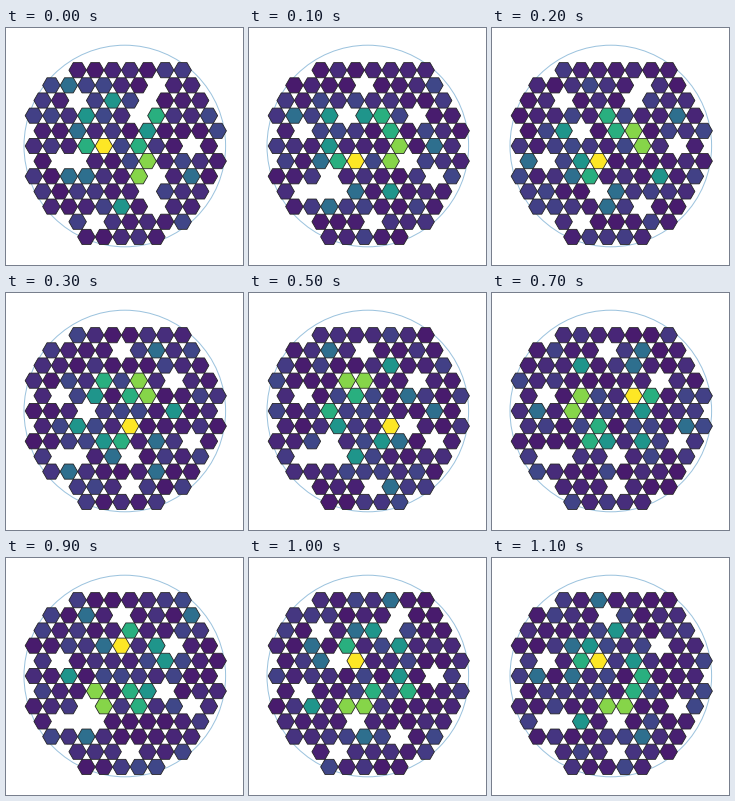
Animation of 237x237 px, one loop 1200 ms. Source, as a matplotlib script:

```python
import numpy as np
import matplotlib.pyplot as plt
from matplotlib.animation import FuncAnimation
from matplotlib.collections import PolyCollection
from matplotlib.patches import Circle

SIZE, DPI, STEPS = 237, 100, 12
PX = 72 / DPI
STEP = 17.5                                # distance between hexagon centres
CENTER, RADIUS = np.array([118.8, 118.0]), 100.8
PIVOT = np.array([118.0, 117.0])           # the bright samples turn around this
GAP_PIVOT = np.array([117.0, 126.0])       # the gaps turn around this
LEVELS = [1.0, 0.82, 0.63, 0.52, 0.36]     # level k is shared by k + 1 samples

# Brightest first, relative to the pivot with y up
SAMPLES = np.array([
    (-21.5, -1.5),
    (28.7, -16.6), (12, -29),
    (20, 0), (-38, 2), (31, 22),
    (-11, 44), (-32, 24), (18, 21), (-4, -57),
    (60, -37), (-35, -27), (-50, 13), (-56, 60), (-56, -31)])
values = np.repeat(LEVELS, np.arange(1, 6))


def polar(radius, angle):
    return np.column_stack([radius * np.cos(angle), radius * np.sin(angle)])


def ring(radius, count, start):
    return polar(radius, np.radians(start) + 2 * np.pi * np.arange(count) / count)


def place(points, turn, pivot):
    """Rotate points counter-clockwise and return stage positions."""
    x, y = points.T
    c, s = np.cos(turn), np.sin(turn)
    return pivot + np.column_stack([x * c - y * s, -(x * s + y * c)])


def distances(a, b):
    return np.hypot(*(a[:, None] - b).transpose(2, 0, 1))


# Staggered rows, cut to the disc
cells = np.array([(27.9 + STEP * (col + (row + 1) % 2 / 2),
                   42.2 + STEP * np.sqrt(0.75) * row)
                  for row in range(12) for col in range(11)])
cells = cells[np.hypot(*(cells - CENTER).T) < 99.1]

gaps = np.vstack([ring(67, 6, 7), ring(40, 3, 75)])

# Dim background samples on a sunflower spiral
rng = np.random.default_rng(4)
order = np.arange(150)
field = polar(98 * np.sqrt((order + 0.5) / 150), order * np.pi * (3 - np.sqrt(5)))
shade = 0.07 + 0.15 * rng.random(150) ** 2


def bin_values(turn):
    result = shade[distances(cells, place(field, turn, PIVOT)).argmin(axis=1)]
    empty = distances(cells, place(gaps, turn, GAP_PIVOT)).min(axis=1) < 10.5
    result[empty] = np.nan
    hits = distances(place(SAMPLES, turn, PIVOT), cells).argmin(axis=1)
    for cell, value in zip(hits[::-1], values[::-1]):
        result[cell] = value
    return result


fig = plt.figure(figsize=(SIZE / DPI, SIZE / DPI), dpi=DPI, facecolor="white")
ax = fig.add_axes([0, 0, 1, 1])
ax.set(xlim=(0, SIZE), ylim=(SIZE, 0))
ax.axis("off")
ax.add_patch(Circle(CENTER, RADIUS, fill=False, ec="#9cc3de", lw=PX))

hexagon = ring(STEP / 2, 6, 0)
tiles = PolyCollection([], edgecolors="#222222", linewidths=0.8 * PX, zorder=2)
ax.add_collection(tiles)


def update(step):
    result = bin_values(2 * np.pi * step / STEPS)
    filled = ~np.isnan(result)
    tiles.set_verts(cells[filled][:, None] + hexagon)
    tiles.set_facecolor(plt.cm.viridis(result[filled]))
    return [tiles]


anim = FuncAnimation(fig, update, frames=STEPS, interval=100,
                     repeat=True, repeat_delay=0, blit=False)
plt.show()
```
